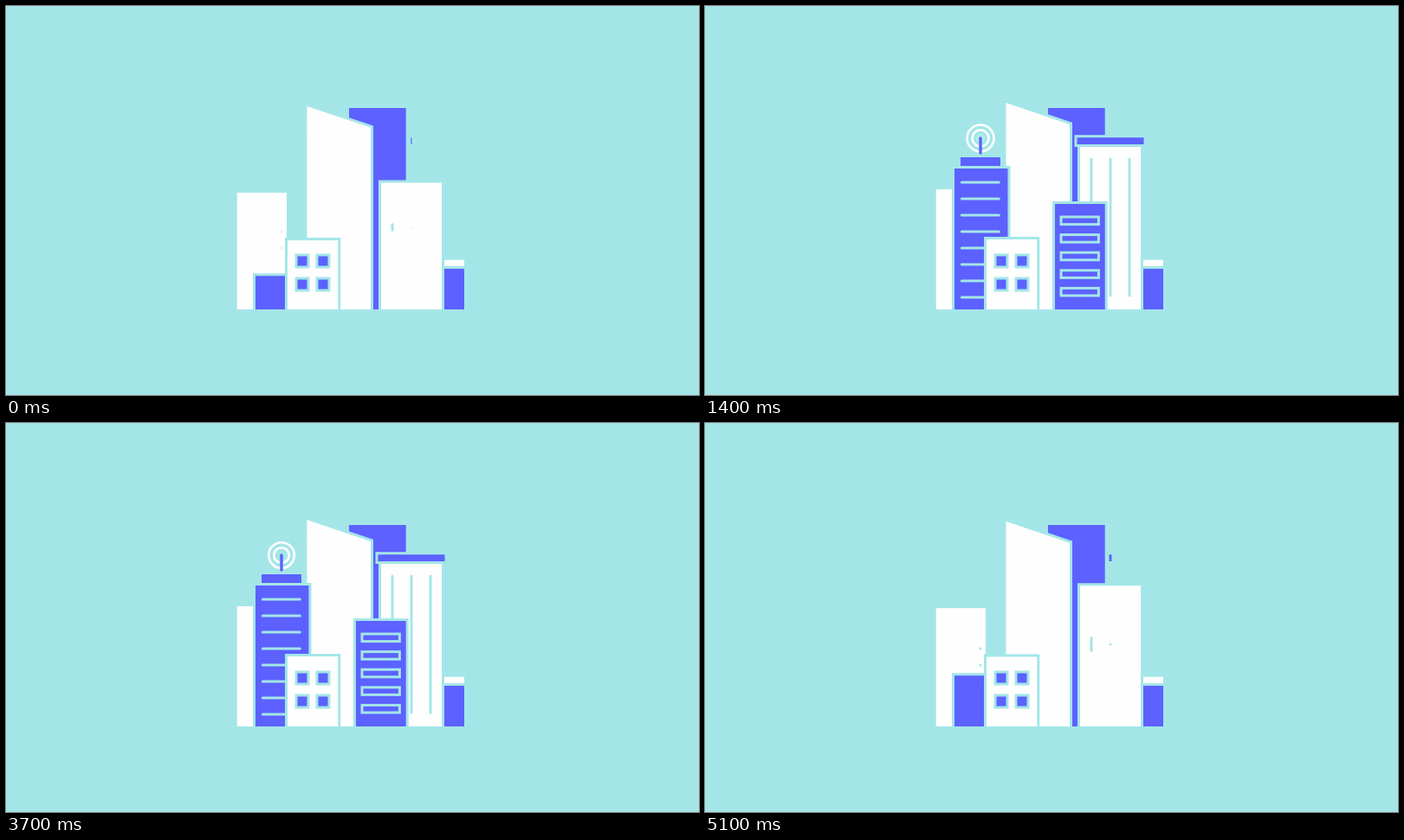
These frames come from a looping animation (800 px wide and 450 px high, 5.2 s). An HTML page:

```html
<!DOCTYPE html>
<html lang="en">
<head>
<meta charset="utf-8">
<title>City skyline</title>
<style>
  html, body { margin: 0; width: 100%; height: 100%; overflow: hidden; background: #a4e6e8; }
  svg { display: block; width: 100vw; height: 100vh; }
</style>
</head>
<body>
<svg id="stage" viewBox="0 0 800 450"></svg>
<script>
const LOOP = 5200, STEP = 100, GROUND = 351;
const SKY = '#a4e6e8', BLUE = '#5c61ff', WHITE = '#fffeff';
const stage = document.getElementById('stage');
const parts = [];

const clamp = v => Math.min(1, Math.max(0, v));
const ease = u => u < .5 ? 4 * u ** 3 : 1 - 4 * (1 - u) ** 3;

function add(tag, attrs) {
  const el = document.createElementNS('http://www.w3.org/2000/svg', tag);
  set(el, attrs);
  return stage.appendChild(el);
}

function set(el, attrs) {
  for (const key in attrs) el.setAttribute(key, attrs[key]);
}

// Every part builds up, then plays the same motion backwards before `end`.
function animate(start, duration, draw, end = 5136) {
  parts.push(time => {
    const local = time < 2600 ? time : end - time;
    draw(ease(clamp((local - start) / duration)));
  });
}

const outline = { stroke: SKY, 'stroke-width': 6, 'paint-order': 'stroke' };

function block(x, y, width, height, fill, extra = {}) {
  return add('rect', { x, y, width, height, fill, ...extra });
}

function building(x, top, width, fill, start, duration) {
  const el = block(x, top, width, 0, fill, outline);
  animate(start, duration, p => {
    const height = (GROUND - top) * p;
    set(el, { y: GROUND - height, height });
  });
}

function growFrom(el, cx, cy, axes, start, duration = 620, end) {
  animate(start, duration, p => {
    const sx = axes.includes('x') ? p : 1;
    const sy = axes.includes('y') ? p : 1;
    set(el, {
      transform: `translate(${cx} ${cy}) scale(${sx} ${sy}) translate(${-cx} ${-cy})`,
      visibility: p > .001 ? 'visible' : 'hidden'
    });
  }, end);
}

function stripe(x1, y1, x2, y2) {
  return add('line', { x1, y1, x2, y2, stroke: SKY, 'stroke-width': 3, 'stroke-linecap': 'round' });
}

// Back row
block(396, 118, 65.7, 233, BLUE);
building(266.7, 212, 57.3, WHITE, -807, 1000);

const tall = add('polygon', { fill: WHITE, ...outline });
animate(-839, 1000, p => {
  const y = top => GROUND - (GROUND - top) * p;
  set(tall, { points: `347.5,${y(112)} 421,${y(137)} 421,351 347.5,351` });
});

// Right building with columns and roof
building(433, 163, 70, WHITE, -384, 620);
[446, 468, 490].forEach((x, i) =>
  growFrom(stripe(x, 177, x, 335), x, 256, 'y', -149 + 93 * i));
growFrom(block(429.5, 152.2, 77, 7.8, BLUE, outline), 468, 156, 'x', -96);

block(506, 293.7, 23, 7.3, WHITE);
block(506, 304, 23, 47, BLUE);

// Antenna tower
const rings = Array.from({ length: 5 }, () =>
  add('circle', { cx: 318, cy: 153, fill: 'none', stroke: WHITE, 'stroke-width': 2.6 }));
const antenna = add('line', {
  x1: 318, x2: 318, y2: 170, stroke: BLUE, 'stroke-width': 3.4, 'stroke-linecap': 'round'
});
animate(224, 620, p => set(antenna, {
  y1: 170 - 17 * p, visibility: p > 0 ? 'visible' : 'hidden'
}));
growFrom(block(295, 175, 46, 10, BLUE), 318, 180, 'x', 40, 560);
building(288, 188, 61.5, BLUE, -242, 620);
for (let i = 0; i < 8; i++) {
  const y = 204 + 19 * i;
  const fromMiddle = Math.abs(i - 3.5) - .5;
  growFrom(stripe(296.3, y, 339.3, y), 318, y, 'x', -110 + 93 * fromMiddle);
}

// Low building
building(325, 270, 58.3, WHITE, -850, 1000);
for (const x of [342, 366])
  for (const y of [295, 322])
    block(x - 5.5, y - 5.5, 11, 11, BLUE, outline);

// Front office block
building(404, 229, 57.7, BLUE, 40, 560);
for (let i = 0; i < 5; i++) {
  const y = 248.3 + 20.6 * i;
  const pane = block(411, y - 4.3, 43.4, 8.6, 'none', { stroke: SKY, 'stroke-width': 3 });
  growFrom(pane, 432.7, y, 'xy', 516 - 92 * i, 620, 5224);
}

function drawRings(time) {
  const age = time - (time < 2600 ? 885 : 2607);
  const fadeIn = clamp((age - 213) / 200);
  rings.forEach((ring, i) => {
    const r = .03 * (age - 200 * i);
    const opacity = fadeIn * clamp((r - 3) / 2) * clamp((19.5 - r) / 3);
    set(ring, { r: Math.max(0, r), opacity });
  });
}

function render(time) {
  parts.forEach(draw => draw(time));
  drawRings(time);
}

const origin = performance.now();
function tick() {
  const elapsed = (performance.now() - origin) % LOOP;
  render(Math.floor(elapsed / STEP) * STEP);
  requestAnimationFrame(tick);
}
tick();
</script>
</body>
</html>
```
